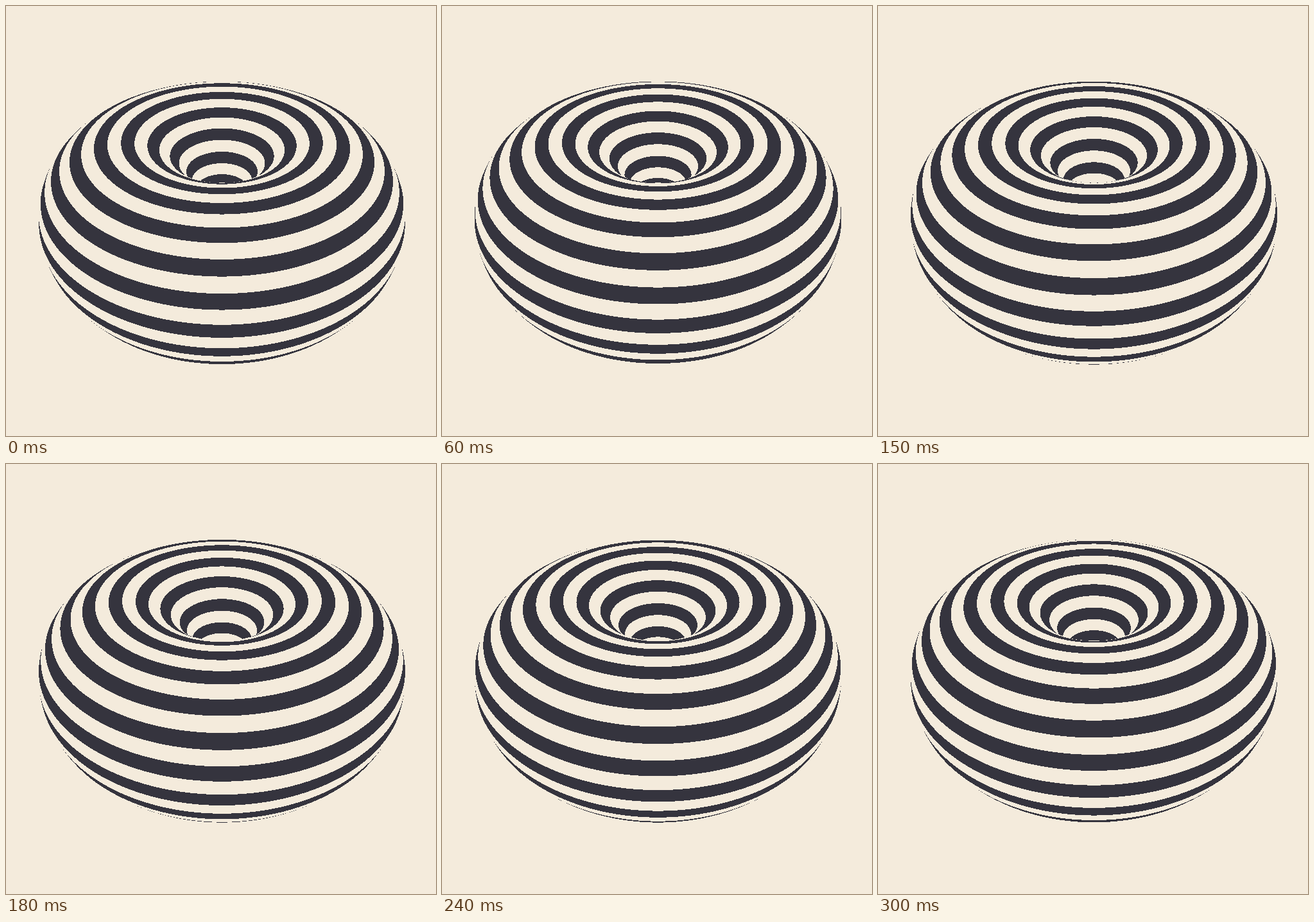
An HTML page with a canvas that plays this animation: 670 px wide and 670 px high, repeating every 330 ms.

```html
<!DOCTYPE html>
<html lang="en">
<head>
<meta charset="utf-8">
<title>Striped torus</title>
<style>
  html, body { margin: 0; width: 100%; height: 100%; overflow: hidden; background: #f4ebdc; }
  canvas { display: block; }
</style>
</head>
<body>
<canvas id="stage" width="670" height="670"></canvas>
<script>
const SIZE = 670;
const LOOP = 330, STEP = 30;
const DARK = [53, 52, 62], LIGHT = [244, 235, 220];
const RAD = Math.PI / 180;

// Torus and camera; lengths are in units of the camera distance.
const RING = 0.2085, TUBE = 0.1565;
const ELEVATION = 37.23 * RAD; // where the camera stands
const PITCH = 39.93 * RAD;     // how far it looks down
const FOCAL = 741.2, CENTER_X = 336.5, CENTER_Y = 337.7;
const BOX = { left: 48, top: 115, right: 625, bottom: 561 };

const STRIPE = 18 * RAD, START = 88.4 * RAD; // angles around the tube

const eyeY = -Math.cos(ELEVATION), eyeZ = Math.sin(ELEVATION);
const sinPitch = Math.sin(PITCH), cosPitch = Math.cos(PITCH);

// Angle around the tube where the ray through a pixel meets the torus, or NaN.
function tubeAngle(px, py) {
  const sx = (px - CENTER_X) / FOCAL, sy = (py - CENTER_Y) / FOCAL;
  const len = Math.hypot(1, sx, sy);
  const dx = sx / len;
  const dy = (cosPitch - sy * sinPitch) / len;
  const dz = (-sinPitch - sy * cosPitch) / len;
  let t = 0.5;
  for (let i = 0; i < 160 && t < 1.6; i++) {
    const x = t * dx, y = t * dy + eyeY, z = t * dz + eyeZ;
    const out = Math.sqrt(x * x + y * y) - RING;
    const gap = Math.sqrt(out * out + z * z) - TUBE;
    if (gap < 2e-5) return Math.atan2(z, out);
    t += gap;
  }
  return NaN;
}

const ctx = document.getElementById("stage").getContext("2d");
const image = ctx.createImageData(SIZE, SIZE);
const pixels = new Uint32Array(image.data.buffer);
const pack = ([r, g, b]) => new Uint32Array(new Uint8Array([r, g, b, 255]).buffer)[0];
const dark = pack(DARK), light = pack(LIGHT);

// Stripe coordinate per pixel: one unit spans a dark and a light band.
const stripes = new Float32Array(SIZE * SIZE).fill(NaN);
for (let y = BOX.top; y < BOX.bottom; y++) {
  for (let x = BOX.left; x < BOX.right; x++) {
    stripes[y * SIZE + x] = (START - tubeAngle(x + 0.5, y + 0.5)) / STRIPE;
  }
}

let shown = -1;
function draw(time) {
  const step = Math.floor((time % LOOP) / STEP);
  if (step === shown) return;
  shown = step;
  const shift = step * STEP / LOOP;
  for (let i = 0; i < pixels.length; i++) {
    const s = stripes[i] + shift;
    pixels[i] = s - Math.floor(s) < 0.5 ? dark : light;
  }
  ctx.putImageData(image, 0, 0);
}

function tick(now) {
  draw(now);
  requestAnimationFrame(tick);
}
draw(0);
requestAnimationFrame(tick);
</script>
</body>
</html>
```
